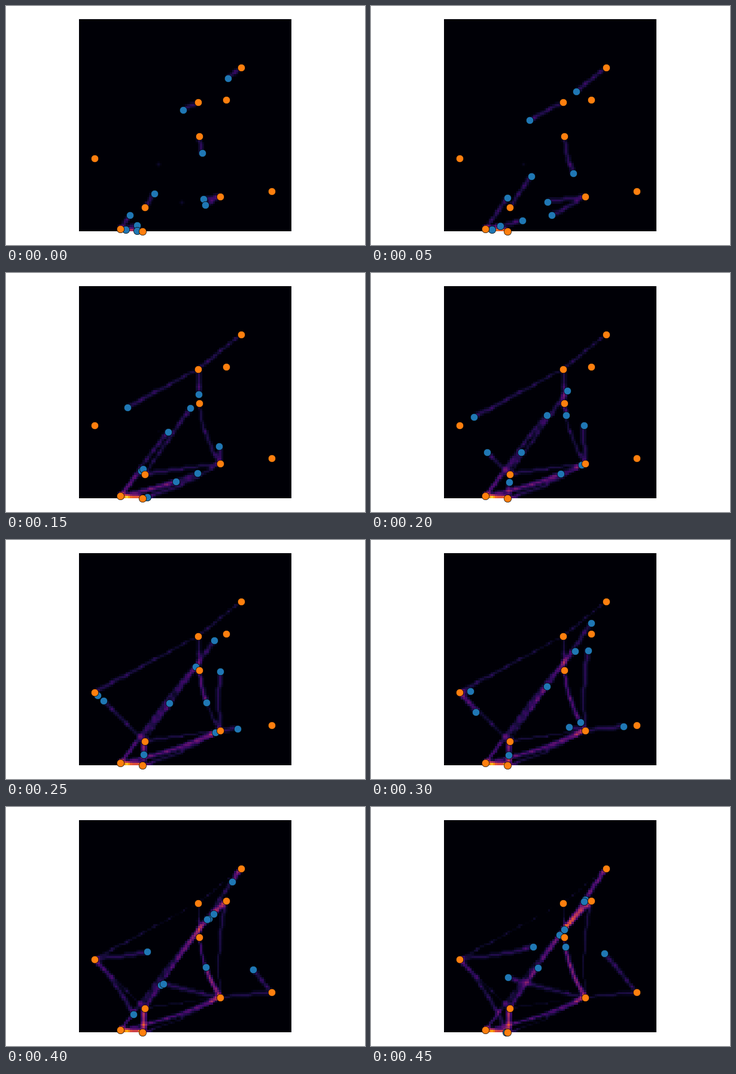
A matplotlib script for the animation above (500 ms loop, 600 by 400 pixels).

```python
import math

import matplotlib.pyplot as plt
import numpy as np
from matplotlib.animation import FuncAnimation

W, H = 600, 400
LEFT, TOP, SIZE = 122, 22, 355
CELLS = 100
FRAMES, INTERVAL = 10, 50
HEAD_START = 0.8            # frames already walked when the loop begins
SPEED, SUBSTEPS = 35.3, 10  # pixels per frame, trail drops per frame
DEPOSIT, EVAPORATION = 0.3, 0.0015
BOW = 6

NODES = {
    "A": (392.7, 103), "B": (367.7, 156.5), "C": (321.2, 160.8), "D": (322.7, 218.2),
    "E": (147.8, 254.6), "F": (443.7, 309.6), "G": (357.7, 318.5), "H": (231.7, 337),
    "I": (190.8, 373.2), "J": (228.2, 377.2),
}
ROUTES = ["ACDGD", "CEJI", "DGBI", "HAI", "GHED",
          "GJHJHA", "IBI", "IGFC", "JIGE", "IJIA"]
# Edges that bulge to the right of somebody walking them in this direction
BOWED = {"DG", "IG", "JG", "BG", "JE", "EG", "ED", "BI", "IA"}


def leg_cost(a, b):
    """Walking cost of an edge; exact grid diagonals go a quarter faster."""
    (x0, y0), (x1, y1) = NODES[a], NODES[b]
    diagonal = abs(abs(x1 - x0) - abs(y1 - y0)) < 3
    return math.hypot(x1 - x0, y1 - y0) / (1.25 if diagonal else 1)


def edge_point(a, b, u):
    p, q = np.array(NODES[a]), np.array(NODES[b])
    dx, dy = q - p
    side = (a + b in BOWED) - (b + a in BOWED)
    normal = np.array([-dy, dx]) / math.hypot(dx, dy)
    return p + u * (q - p) + side * BOW * math.sin(math.pi * u) * normal


def walk(route, t):
    left = SPEED * (t + HEAD_START)
    for a, b in zip(route, route[1:]):
        cost = leg_cost(a, b)
        if left <= cost:
            return edge_point(a, b, left / cost)
        left -= cost
    return np.array(NODES[route[-1]])


def positions(t):
    return np.array([walk(route, t) for route in ROUTES])


def drop(grid, x, y, amount=DEPOSIT):
    col = min(CELLS - 1, max(0, int((x - LEFT) * CELLS / SIZE)))
    row = min(CELLS - 1, max(0, int((y - TOP) * CELLS / SIZE)))
    grid[row, col] += amount


def blur(grid):
    p = np.pad(grid, 1, mode="symmetric")
    p = (p[:-2] + 2 * p[1:-1] + p[2:]) / 4
    return (p[:, :-2] + 2 * p[:, 1:-1] + p[:, 2:]) / 4


def trail_frames():
    specks = np.zeros((CELLS, CELLS))
    drop(specks, 255, 265)
    drop(specks, 294, 329)
    trail = blur(specks)
    frames = []
    first = -round(HEAD_START * SUBSTEPS)
    for step in range(first, (FRAMES - 1) * SUBSTEPS + 1):
        fresh = np.zeros_like(trail)
        for x, y in positions(step / SUBSTEPS):
            drop(fresh, x, y)
        trail = np.maximum(trail - EVAPORATION, 0) + blur(fresh)
        if step >= 0 and step % SUBSTEPS == 0:
            frames.append(trail)
    return frames


trails = trail_frames()

fig = plt.figure(figsize=(W / 100, H / 100), dpi=100, facecolor="white")
ax = fig.add_axes([0, 0, 1, 1])
ax.axis("off")
image = ax.imshow(trails[0], cmap="inferno", vmin=-0.008, vmax=1, aspect="auto",
                  interpolation="nearest",
                  extent=(LEFT, LEFT + SIZE, TOP + SIZE, TOP))
ax.set(xlim=(0, W), ylim=(H, 0))
style = dict(s=80, edgecolors="black", linewidths=0.5)
dots = ax.scatter(*positions(0).T, color="tab:blue", zorder=2, **style)
ax.scatter(*zip(*NODES.values()), color="tab:orange", zorder=3, **style)


def update(i):
    image.set_data(trails[i])
    dots.set_offsets(positions(i))
    return image, dots


anim = FuncAnimation(fig, update, frames=FRAMES, interval=INTERVAL, repeat=True)
plt.show()
```
